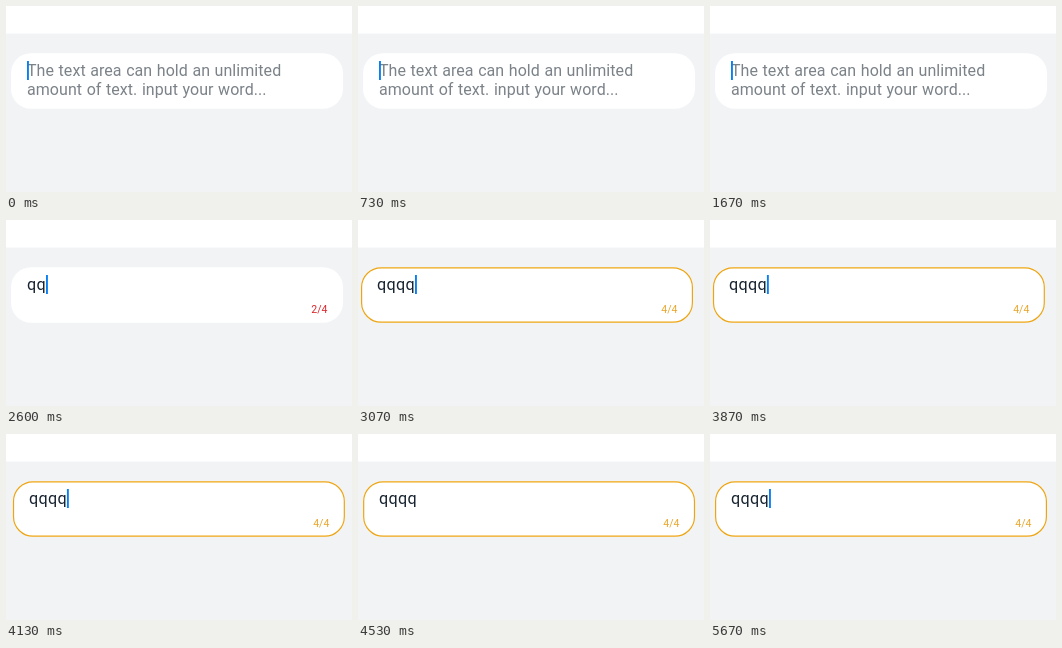
Animation, 346 px wide and 186 px high, one loop 6.14 s. Source, as an HTML page with a canvas:

```html
<!DOCTYPE html>
<html lang="en">
<head>
<meta charset="utf-8">
<title>Text area</title>
<style>
  html, body { margin: 0; width: 100%; height: 100%; overflow: hidden; background: #f1f3f5; }
  canvas { display: block; }
</style>
</head>
<body>
<canvas id="stage"></canvas>
<script>
const W = 346, H = 186, LOOP = 6140, TICK = 1000 / 15;
const BOX = { x: 5, y: 47.2, w: 332, h: 55.6, r: 20 };
const TEXT_X = 21, BASE = 70.4, LINE = 19;
const FONT = 'Roboto, "Noto Sans", sans-serif';
const HINT = ['The text area can hold an unlimited', 'amount of text. input your word...'];
const KEYS = [2270, 2600, 2730, 2930];
const BLINKS = [130, 730, 1200, 1670, 2270, 2270, 4270, 4800, 5270, 5670];
const LIMIT = 3070, RELEASE = 3470, REST = 5200;

const canvas = document.getElementById('stage');
const ctx = canvas.getContext('2d');
const dpr = window.devicePixelRatio || 1;
canvas.width = W * dpr;
canvas.height = H * dpr;
canvas.style.width = W + 'px';
canvas.style.height = H + 'px';

const passed = (list, t) => list.filter(v => t >= v).length;

// Pulled to the left, then a damped swing back to rest.
function shake(t) {
  if (t < LIMIT || t >= REST) return 0;
  const now = Math.floor((t + 4) / TICK) * TICK;
  if (t < RELEASE) return -2 - 4 * Math.min(1, Math.max(0, now - LIMIT) / 200);
  const s = Math.max(0, now - RELEASE) / 1000;
  return -8 * Math.exp(-1.9 * s) * Math.cos(2 * Math.PI * s / 0.47);
}

function setFont(size, letter, word = 0) {
  ctx.font = size + 'px ' + FONT;
  ctx.letterSpacing = letter + 'px';
  ctx.wordSpacing = word + 'px';
}

function label(str, x, y, color, align = 'left') {
  ctx.fillStyle = color;
  ctx.textAlign = align;
  ctx.fillText(str, x, y);
}

function roundBox(inset) {
  ctx.beginPath();
  ctx.roundRect(BOX.x + inset, BOX.y + inset, BOX.w - 2 * inset, BOX.h - 2 * inset, BOX.r - inset);
}

function draw(t) {
  const count = passed(KEYS, t);
  const full = t >= LIMIT;
  const typed = 'q'.repeat(count);

  ctx.setTransform(dpr, 0, 0, dpr, 0, 0);
  ctx.fillStyle = '#f1f3f5';
  ctx.fillRect(0, 0, W, H);
  ctx.fillStyle = '#fff';
  ctx.fillRect(0, 0, W, 27.6);

  ctx.translate(shake(t), 0);
  roundBox(0);
  ctx.fill();
  if (full) {
    roundBox(0.6);
    ctx.strokeStyle = '#eda514';
    ctx.lineWidth = 1.2;
    ctx.stroke();
  }

  if (count) {
    setFont(16.2, 0.3);
    label(typed, TEXT_X, BASE, '#182431');
  } else {
    setFont(16, 0.06, 0.5);
    HINT.forEach((row, i) => label(row, TEXT_X, BASE + i * LINE, '#7b8288'));
  }

  if (passed(BLINKS, t) % 2 === 0) {
    ctx.fillStyle = '#0a7ff0';
    ctx.fillRect(TEXT_X + ctx.measureText(typed).width, 55, 1.9, 19);
  }

  if (count >= 2) {
    setFont(10.5, 0);
    label(count + '/4', 321.4, 93, full ? '#e9a62c' : '#d9262b', 'right');
  }
}

const start = performance.now();
function frame() {
  draw((performance.now() - start) % LOOP);
  requestAnimationFrame(frame);
}
frame();
</script>
</body>
</html>
```
